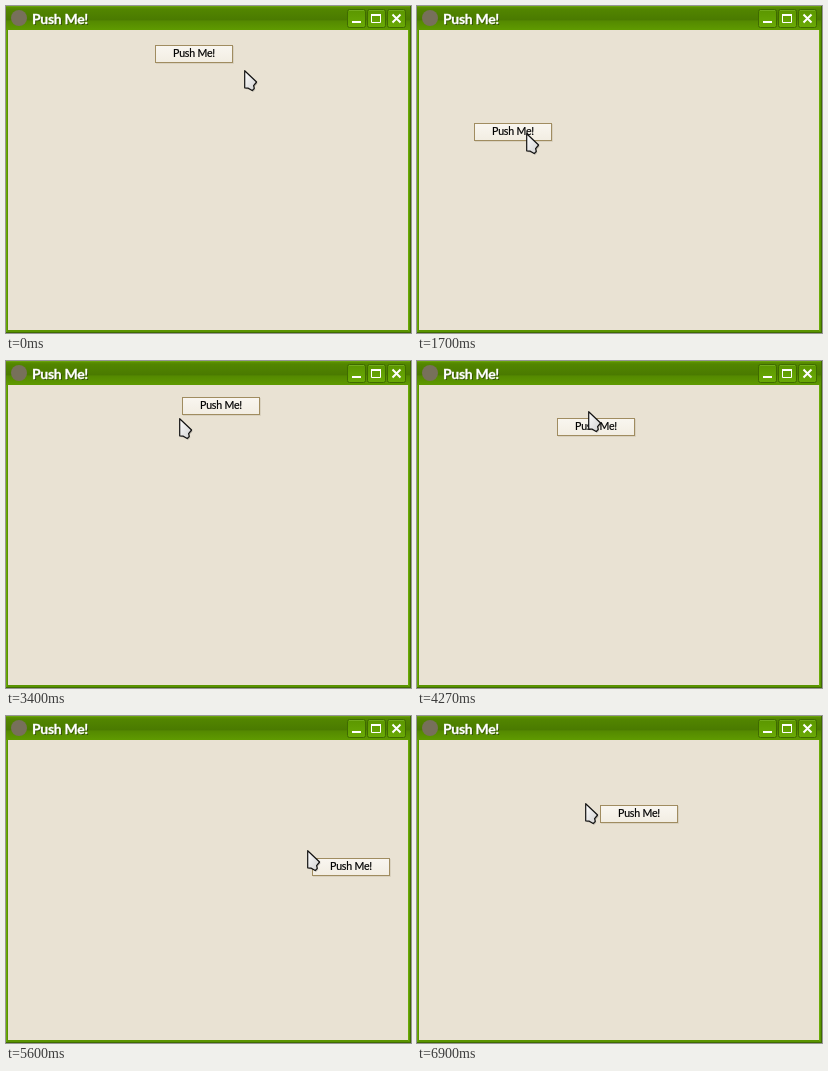
An HTML page that plays this animation: 405x327 px, repeating every 7000 ms.

```html
<!DOCTYPE html>
<html lang="en">
<head>
<meta charset="utf-8">
<title>Push Me!</title>
<style>
  html, body { margin: 0; width: 100%; height: 100%; overflow: hidden; background: #e9e2d3; }
  svg { display: block; width: 100%; height: 100%; }
  text { font-family: Lato, "Open Sans", sans-serif; }
</style>
</head>
<body>
<svg viewBox="0 0 405 327">
  <defs>
    <linearGradient id="bar" x1="0" y1="0" x2="0" y2="1">
      <stop offset="0" stop-color="#5f9600"/>
      <stop offset=".14" stop-color="#528500"/>
      <stop offset=".58" stop-color="#4a7a00"/>
      <stop offset=".62" stop-color="#548900"/>
      <stop offset="1" stop-color="#5f9a00"/>
    </linearGradient>
    <linearGradient id="key" x1="0" y1="0" x2="0" y2="1">
      <stop offset="0" stop-color="#5b9600"/>
      <stop offset="1" stop-color="#6aaa06"/>
    </linearGradient>
    <linearGradient id="face" x1="0" y1="0" x2="0" y2="1">
      <stop offset="0" stop-color="#f9f6f0"/>
      <stop offset="1" stop-color="#f2ede2"/>
    </linearGradient>
    <linearGradient id="metal" x1="0" y1="0" x2="1" y2="1">
      <stop offset="0" stop-color="#fff"/>
      <stop offset="1" stop-color="#cfcfcf"/>
    </linearGradient>
    <path id="arrow" d="M.7 .7V17.8L4.3 18.2L8.2 20.6L10.3 18.4L9.6 15.6L12.6 12Z"/>
    <g id="frameKey">
      <rect x=".5" y=".5" width="18" height="18" rx="2" fill="url(#key)" stroke="#3f6b00"/>
      <path d="M2 1.5H17" stroke="#7db52a" opacity=".7"/>
    </g>
  </defs>

  <!-- window frame -->
  <rect width="405" height="327" fill="#5a9400"/>
  <path d="M.5 24V326.5M402.5 24V325" stroke="#6aaa06"/>
  <rect width="405" height="24" fill="url(#bar)"/>
  <path d="M0 .5H405" stroke="#6aa30c"/>
  <path d="M404.5 0V327M0 326.5H405" stroke="#3f6b00"/>
  <rect x="2" y="24" width="400" height="300" fill="#e9e2d3"/>

  <!-- title bar -->
  <circle cx="13" cy="12" r="8" fill="#77705a"/>
  <g font-size="14" font-weight="700" letter-spacing="-.3">
    <text x="27" y="19" fill="#2f4d00">Push Me!</text>
    <text x="26" y="18" fill="#fff" stroke="#fff" stroke-width=".3">Push Me!</text>
  </g>
  <use href="#frameKey" x="341" y="3"/>
  <use href="#frameKey" x="361" y="3"/>
  <use href="#frameKey" x="381" y="3"/>
  <g fill="none" stroke="#fff" stroke-width="2">
    <path d="M346 16H355M365 9H375M386.5 8.5L394.5 16.5M394.5 8.5L386.5 16.5"/>
    <path d="M365.5 8.5H374.5V16.5H365.5Z" stroke-width="1"/>
  </g>

  <g id="button">
    <path d="M1 18.5H78.5V1" fill="none" stroke="#cfc6b3" opacity=".6"/>
    <rect x=".5" y=".5" width="77" height="17" fill="url(#face)" stroke="#a08c60"/>
    <text x="39" y="12" font-size="10.6" letter-spacing="-.2" text-anchor="middle" stroke="#000" stroke-width=".2">Push Me!</text>
  </g>
  <g id="cursor">
    <use href="#arrow" x="1" y="1.2" opacity=".22"/>
    <use href="#arrow" fill="url(#metal)" stroke="#111" stroke-width="1.2" stroke-linejoin="round"/>
  </g>
</svg>
<script>
const LOOP = 7000, TICK = 50;
const button = document.getElementById("button");
const cursor = document.getElementById("cursor");

// Straight moves, with a rest wherever one ends before the next begins.
const moves = [];
let pose = [238, 64, 149, 39];
function move(from, to, [cx, cy], [bx, by]) {
  const end = [cx, cy, bx, by];
  moves.push({ from, to, start: pose, end });
  pose = end;
}

move(0, 0, [238, 64], [149, 39]);
move(50, 360, [150, 39], [91, 43]);
move(520, 820, [89, 120], [10, 122]);
move(820, 1180, [40, 157], [13, 115]);
move(1230, 1900, [143, 112], [78, 118]);
move(2010, 2470, [63, 111], [30, 83]);
move(2470, 2680, [86, 93], [54, 67]);
move(2730, 3040, [132, 76], [112, 55]);
move(3200, 3400, [173, 57], [176, 36]);
move(3400, 3860, [248, 41], [186, 47]);
move(4120, 4270, [171, 50], [140, 57]);
move(4270, 4820, [215, 85], [211, 93]);
move(4930, 5440, [301, 134], [306, 142]);
move(5600, 5910, [368, 140], [300, 138]);
move(5910, 6220, [338, 132], [278, 106]);
move(6330, 6900, [168, 87], [183, 89]);

function poseAt(t) {
  const { from, to, start, end } = moves.filter(m => m.from <= t).pop();
  if (t >= to) return end;
  const u = Math.floor((t - from) / TICK) * TICK / (to - from);
  return start.map((a, i) => Math.round(a + (end[i] - a) * u));
}

function draw(t) {
  const [cx, cy, bx, by] = poseAt(t);
  cursor.setAttribute("transform", `translate(${cx} ${cy})`);
  button.setAttribute("transform", `translate(${bx} ${by})`);
}

const begin = performance.now();
function frame() {
  draw((performance.now() - begin) % LOOP);
  requestAnimationFrame(frame);
}
frame();
</script>
</body>
</html>
```
